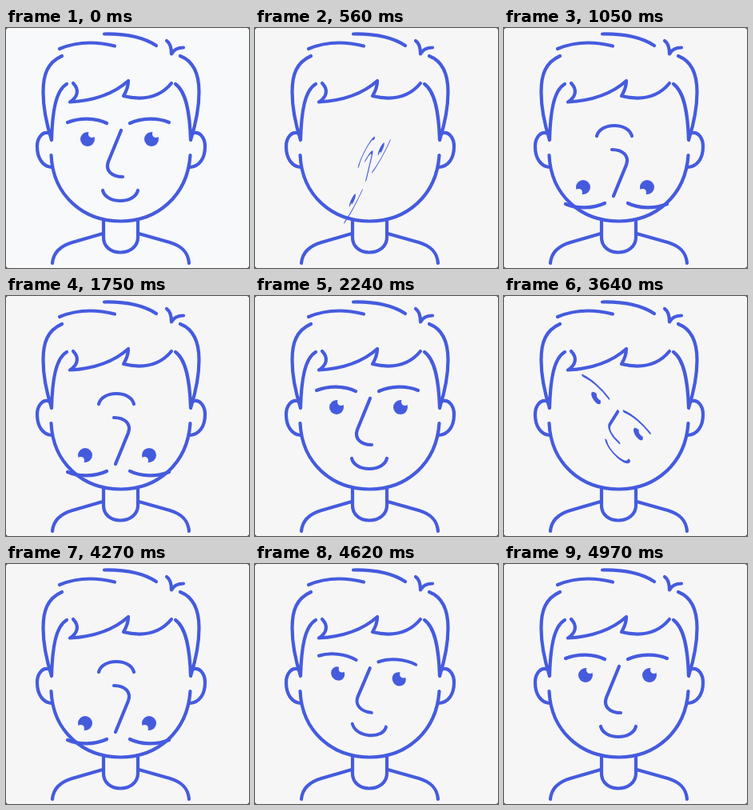
An HTML page for the animation above (5.11 s loop, 304 by 300 pixels).

```html
<!DOCTYPE html>
<html lang="en">
<head>
<meta charset="utf-8">
<title>Flipping face</title>
<style>
  html, body { margin: 0; width: 100%; height: 100%; overflow: hidden; background: #333; }
  svg { --paper: #f7f9fa; display: block; width: 304px; height: 300px; border-radius: 3px; background: var(--paper); }
  path { fill: none; stroke: #455bde; stroke-width: 4.2; stroke-linecap: round; stroke-linejoin: round; }
  .pupil { fill: #455bde; }
  .glint { fill: var(--paper); }
</style>
</head>
<body>
<svg id="stage" viewBox="0 0 304 300">
  <g id="head">
    <path d="M67 26C86 18 110 16 136 22.500M123 7.500C150 7 171 11 188 22"/>
    <path d="M201 16Q207 20 207 32.500Q211 24.500 222 24.500"/>
    <path d="M70 35C52 43 46.500 58 46.500 80C46.500 101 51 121 57 140C58 105 62 78 76 70"/>
    <path d="M218 35C236 42 241.500 60 241.500 80C241.500 102 237 121 231 140C230 108 226 80 212 70"/>
    <path d="M84 69C92 77 90 86 80 92.500C107 91 133 84 153 66C153 74 150 80 147 85C172 91 193 86 207 69"/>
    <path d="M55 132C46 128 39 137 39 148C39 163 46 173 57 174"/>
    <path d="M233 132C242 128 249 137 249 148C249 163 242 173 230 174"/>
    <path d="M56.500 159C59 210 97 241.500 143.500 241.500C189 241.500 227 210 230.500 159"/>
    <path d="M122 241V262C122 273 131 280.500 143 280.500C155 280.500 165 273 165 262V241"/>
    <path d="M121 257L83 268C66 273 59 282 58 294M166 257L205 268C222 273 228 282 229 294"/>
  </g>
  <g id="face">
    <path d="M77 118C92 112 112 112 126 119M155 119C170 112 190 112 204 118"/>
    <path d="M144 128L128 167C124 178 132 186 146 186"/>
    <path d="M121 203C123 211 132 216 143 216C154 216 163 211 165 203"/>
    <circle class="pupil" cx="102" cy="139" r="9"/>
    <circle class="glint" cx="107.500" cy="132.500" r="4.500"/>
    <circle class="pupil" cx="182" cy="139" r="9"/>
    <circle class="glint" cx="187.500" cy="132.500" r="4.500"/>
  </g>
</svg>
<script>
const LOOP = 5110, TICK = 70, FLIP = 200, SNAP = 1050;
const CX = 140.5, CY = 169;
const starts = [40, 515, SNAP, 1147, 1570, 2060, 2480, 2973, 3390, 3553, 3950, 4440, 4600, 4760];
const stage = document.getElementById('stage');
const face = document.getElementById('face');

// cubic-bezier(.25, .1, .25, 1)
function ease(x) {
  if (x <= 0 || x >= 1) return x <= 0 ? 0 : 1;
  const curve = (s, a, b) => 3 * (1 - s) ** 2 * s * a + 3 * (1 - s) * s * s * b + s ** 3;
  let lo = 0, hi = 1;
  for (let i = 0; i < 20; i++) {
    const mid = (lo + hi) / 2;
    if (curve(mid, 0.25, 0.25) < x) lo = mid; else hi = mid;
  }
  return curve(lo, 0.1, 1);
}

// Each start turns the face half way round, alternately there and back.
function angleAt(t) {
  const i = starts.findLastIndex(s => s <= t);
  if (i < 0) return 0;
  const p = starts[i] === SNAP ? 1 : ease((t - starts[i]) / FLIP);
  return Math.PI * (i % 2 ? 1 - p : p);
}

function draw(now) {
  const t = Math.floor((now % LOOP) / TICK) * TICK;
  const a = angleAt(t), c = Math.cos(a), s = Math.sin(a);
  // Flat view of rotateX(a) rotateY(a)
  face.setAttribute('transform',
    `translate(${CX} ${CY}) matrix(${c} ${s * s} 0 ${c} 0 0) translate(${-CX} ${-CY})`);
  stage.style.setProperty('--paper', t < 560 ? '#f7f9fa' : '#f6f6f6');
}

const t0 = performance.now();
function loop() {
  draw(performance.now() - t0);
  requestAnimationFrame(loop);
}
loop();
</script>
</body>
</html>
```
